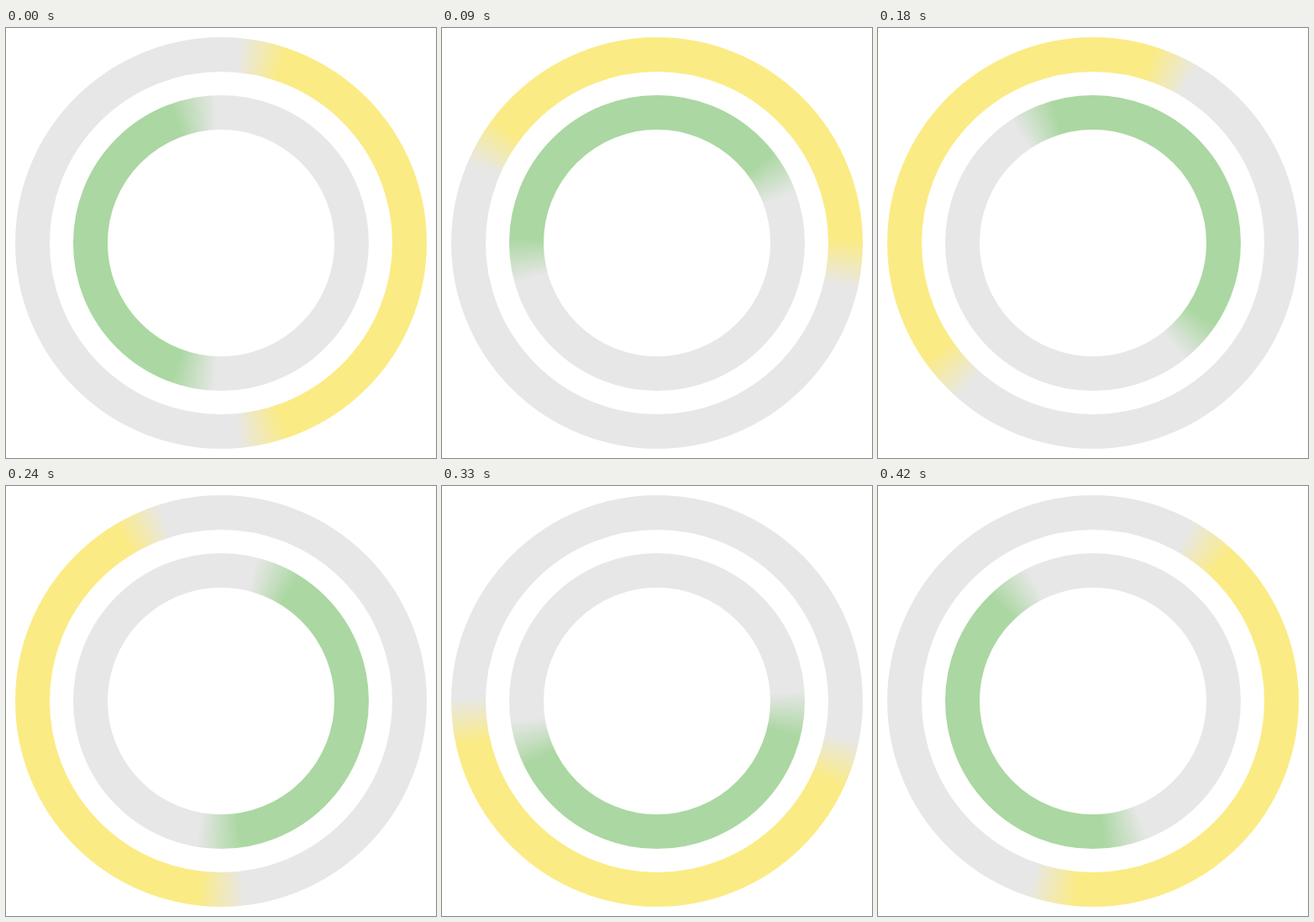
An HTML page with a canvas that plays this animation: 512x512 px, repeating every 450 ms.

```html
<!DOCTYPE html>
<html lang="en">
<head>
<meta charset="utf-8">
<title>Counter-rotating rings</title>
<style>
  html, body { margin: 0; height: 100%; overflow: hidden; background: #fff; }
  canvas { display: block; }
</style>
</head>
<body>
<canvas id="stage" width="512" height="512"></canvas>
<script>
const ctx = document.getElementById('stage').getContext('2d');
const CENTER = 256, WIDTH = 41, GREY = '#e7e7e7';
const STEPS = 15, STEP_MS = 30;

// Half of the ring is coloured; both ends fade into grey between two angles.
function ring(radius, color, fadeStart, fadeEnd, degrees) {
  const start = (degrees - 90) * Math.PI / 180;
  const gradient = ctx.createConicGradient(start, CENTER, CENTER);
  const stops = [
    [0, GREY], [fadeStart, GREY], [fadeEnd, color],
    [180 - fadeEnd, color], [180 - fadeStart, GREY], [360, GREY]
  ];
  for (const [angle, tone] of stops) gradient.addColorStop(angle / 360, tone);
  ctx.strokeStyle = gradient;
  ctx.lineWidth = WIDTH;
  ctx.beginPath();
  ctx.arc(CENTER, CENTER, radius, 0, 2 * Math.PI);
  ctx.stroke();
}

function draw() {
  const step = Math.floor(performance.now() / STEP_MS) % STEPS;
  const turn = step * 360 / STEPS;
  ctx.clearRect(0, 0, 512, 512);
  ring(224.5, '#fbeb84', 5, 19, -turn);
  ring(155.5, '#abd7a2', 2, 20, 180 + turn);
  requestAnimationFrame(draw);
}
draw();
</script>
</body>
</html>
```
